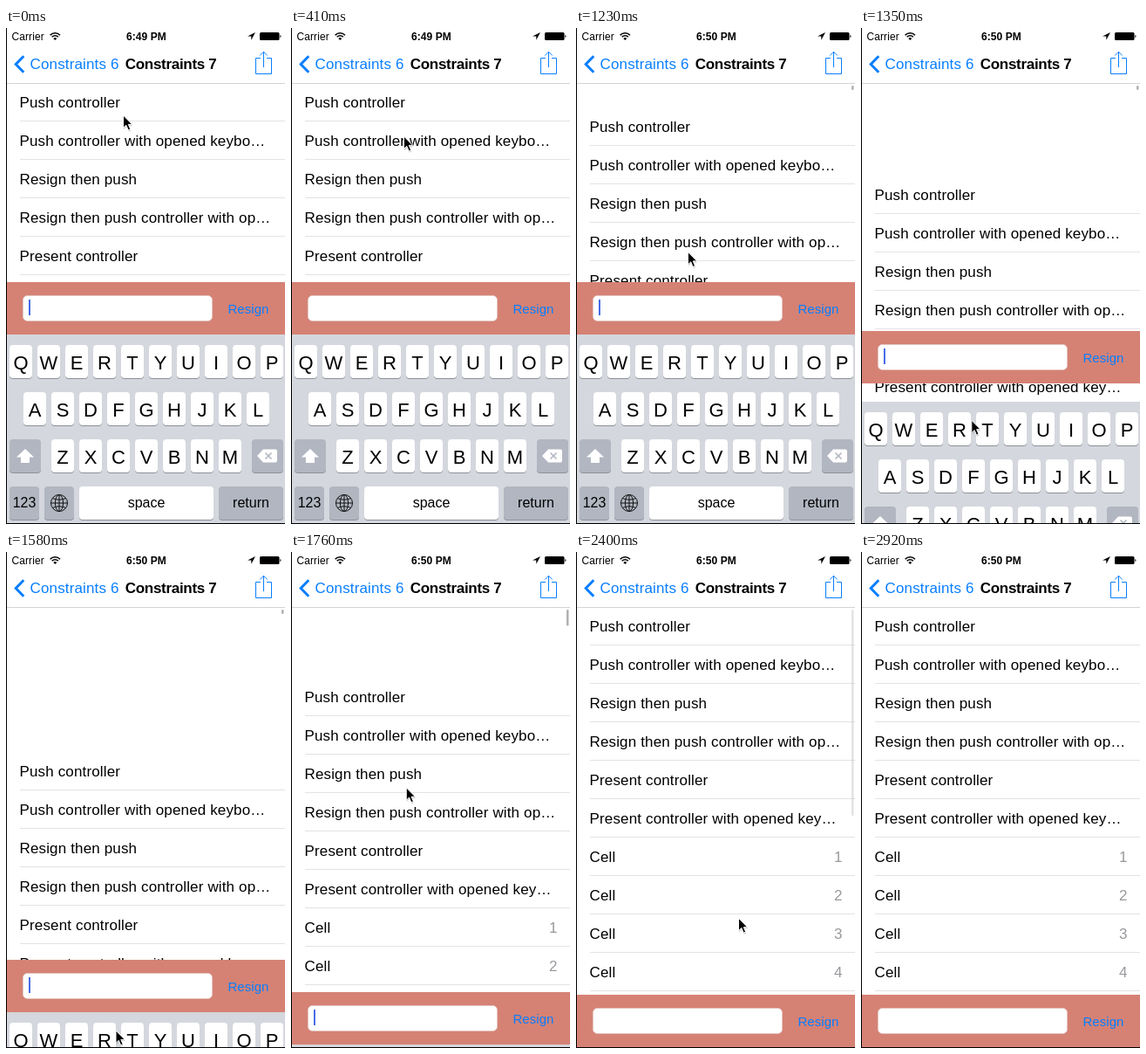
Animation of 320x568 px, one loop 3.79 s. Source, as an HTML page:

```html
<!DOCTYPE html>
<html lang="en">
<head>
<meta charset="utf-8">
<title>Keyboard dismissal</title>
<style>
  html, body { margin: 0; width: 100%; height: 100%; overflow: hidden; background: #fff; }
  svg { display: block; width: 100vw; height: 100vh; }
  text { font-family: "Liberation Sans", Arial, sans-serif; font-size: 17px; letter-spacing: .15px; }
  .blue { fill: #087eff; }
  .line { fill: none; stroke: #087eff; }
  .status { font-size: 12px; letter-spacing: .08px; }
  .bold { font-weight: bold; }
  .mid { text-anchor: middle; }
  .letter { font-size: 22px; letter-spacing: 0; }
  .label { font-size: 16px; letter-spacing: 0; }
</style>
</head>
<body>
<svg viewBox="0 0 320 568">
  <rect width="320" height="568" fill="#fff"/>
  <g id="list"></g>
  <rect id="scroller" x="316" y="66" width="2.5" rx="1.25" fill="#b0b0b0"/>

  <g id="nav">
    <rect width="320" height="63" fill="#fff"/>
    <rect y="63" width="320" height="1" fill="#d4d4d4"/>
    <text class="status" x="6.5" y="13.5">Carrier</text>
    <g fill="none" stroke="#000" stroke-width="1.6">
      <path d="M50.6 8.2a8 8 0 0 1 11.4 0M52.7 10.3a5 5 0 0 1 7.2 0"/>
      <path d="M56.3 14l-2-2.1a2.9 2.9 0 0 1 4 0z" fill="#000" stroke="none"/>
    </g>
    <text id="clock" class="status bold mid" x="161" y="13.5"></text>
    <path d="M286 5l-9 4.4h4.3v4.3z"/>
    <rect x="291" y="5" width="22.5" height="9" rx="1.5"/>
    <path d="M314.4 8a1.6 1.6 0 0 1 0 3z"/>
    <path class="line" d="M20.3 32.3l-9 9.2 9 9.2" stroke-width="3"/>
    <text class="blue" x="27.5" y="47">Constraints 6</text>
    <text class="bold" x="136.8" y="47" style="letter-spacing:-.3px">Constraints 7</text>
    <path class="line" d="M292 34.5h-5.5v18h18v-18h-5.5M295.5 27v18M291.2 31.5l4.3-4.3 4.3 4.3"/>
  </g>

  <g id="keys"></g>
  <g id="bar">
    <rect width="320" height="60" fill="#d58275"/>
    <rect x="19.5" y="15.5" width="217" height="29" rx="5" fill="#fff" stroke="#e3c4bf" stroke-width=".7"/>
    <rect id="caret" x="26" y="20" width="2" height="18" fill="#4a6be8"/>
    <text class="blue" x="254.5" y="35.5" style="font-size:15px;letter-spacing:.03px">Resign</text>
  </g>

  <path d="M0 0h1v568h-1zM0 567h320v1h-320z"/>
  <g id="cursor">
    <path d="M.5 2v14l3.3-3 2.4 5.5 2.4-1-2.4-5.4h4.6z" fill="#000" opacity=".2"/>
    <path d="M0 0v14.4l3.3-3.1 2.4 5.6 2.5-1.1-2.4-5.4h4.5z" stroke="#fff" stroke-width="1"/>
  </g>
</svg>
<script>
const LOOP = 3790, STEP = 58.5;
const DRAG = 1090, HOLD = 1462, RELEASE = 1614;
const GRAB_Y = 124, LOW_Y = 548;
const el = id => document.getElementById(id);

// Static parts
const titles = ["Push controller", "Push controller with opened keybo…", "Resign then push",
  "Resign then push controller with op…", "Present controller", "Present controller with opened key…"];

function row(i) {
  const y = 63 + i * 44, n = i - titles.length + 1;
  const detail = n > 0
    ? `<text x="305.5" y="${y + 28}" text-anchor="end" fill="#98989d">${n}</text>` : "";
  return `<text x="15.5" y="${y + 28}">${titles[i] || "Cell"}</text>${detail}
    <rect x="16" y="${y + 43.5}" width="304" height=".5" fill="#c6c5ca"/>`;
}
el("list").innerHTML = Array.from({ length: 11 }, (_, i) => row(i)).join("");

function key(x, y, w, label, dark, cls = "label", drop = 24) {
  return `<rect x="${x}" y="${y + 1}" width="${w}" height="38" rx="4" fill="#8d9096"/>
    <rect x="${x}" y="${y}" width="${w}" height="38" rx="4" fill="${dark ? "#b1b6c1" : "#fff"}"/>
    <text class="mid ${cls}" x="${x + w / 2}" y="${y + drop}">${label}</text>`;
}
const letters = (str, x, y) =>
  [...str].map((c, i) => key(x + i * 32, y, 26, c, false, "letter", 27.5)).join("");

// Keyboard coordinates start at its top edge
el("keys").innerHTML = `<rect width="320" height="217" fill="#d4d7dd"/>`
  + letters("QWERTYUIOP", 4, 12) + letters("ASDFGHJKL", 20, 66) + letters("ZXCVBNM", 52, 120)
  + key(4, 120, 36, "", true) + key(282, 120, 36, "", true)
  + key(4, 174, 34, "123", true) + key(44, 174, 34, "", true)
  + key(84, 174, 154, "space") + key(244, 174, 74, "return", true)
  + `<path d="M22 131l10 9.5h-5v6.5h-10v-6.5h-5z" fill="#fff"/>
    <path d="M295 131.5h14q2 0 2 2v11q0 2-2 2h-14l-7-7.5z" fill="#fff"/>
    <path d="M297.5 135.5l7 7m0-7l-7 7" stroke="#b1b6c1" stroke-width="1.6"/>
    <g fill="none" stroke="#111" stroke-width="1">
      <circle cx="61" cy="193" r="9.5"/><ellipse cx="61" cy="193" rx="4.6" ry="9.5"/>
      <path d="M61 183.5v19M51.5 193h19M53.3 187.5q7.7 3.4 15.4 0M53.3 198.5q7.7-3.4 15.4 0"/>
    </g>`;

// Motion
const mix = (a, b, k) => a + (b - a) * k;
const half = v => Math.round(v * 2) / 2;

function ease(t, from, to) {
  const s = Math.min(1, Math.max(0, (t - from) / (to - from)));
  return s * s * (3 - 2 * s);
}

const finger = t => mix(GRAB_Y, LOW_Y, ease(t, DRAG, HOLD));

// Rubber-band resistance of an overscrolled list
const rubber = d => 568 * (1 - 1 / (1 + d * .55 / 568));

// The list trails the finger, then springs back critically damped
function listY(t) {
  if (t < RELEASE) return rubber(finger(t - 56) - GRAB_Y);
  const u = (t - RELEASE) / 82;
  return rubber(LOW_Y - GRAB_Y) * (1 + u) * Math.exp(-u);
}

// The finger pushes the keyboard down; once released it slides out
function keysY(t) {
  if (t < RELEASE) return Math.max(351, finger(t) - 21);
  return 568 - (589 - LOW_Y) * Math.exp((RELEASE - t) / 60);
}

const barY = t => Math.min(507, keysY(t < RELEASE ? t - 14 : t) - (t < HOLD ? barGap(t) : 60));

// The bar falls slightly behind the keyboard while dragging
const barGap = t => 60;

// Pointer legs: start, end, x, y
const legs = [
  [0, 410, 129.5, GRAB_Y],
  [DRAG, HOLD, 126, LOW_Y],
  [1580, 1800, 133, 236],
  [1800, 1980, 139.5, 236],
  [2040, 2340, 186, 415],
  [2340, 2930, 204, 569]
];

function pointer(t) {
  return legs.reduce(([x, y], [from, to, nx, ny]) => {
    const k = ease(t, from, to);
    return [mix(x, nx, k), mix(y, ny, k)];
  }, [134.5, 100]);
}

const move = (id, x, y) => el(id).setAttribute("transform", `translate(${x} ${y})`);

function draw(ms) {
  const t = Math.floor((ms + 8) / STEP) * STEP;
  move("list", 0, half(listY(t)));
  move("bar", 0, Math.round(barY(t)));
  move("keys", 0, Math.round(keysY(t)));
  move("cursor", ...pointer(t));
  el("clock").textContent = t < 1170 ? "6:49 PM" : "6:50 PM";
  el("caret").setAttribute("opacity", t < 1810 ? 1 - ease(t, 280, 405) + ease(t, 650, 815) : 0);
  el("scroller").setAttribute("height", mix(5, 236, ease(t, 1706, 2041)));
  el("scroller").setAttribute("opacity", t < 1110 ? 0 : 1 - ease(t, 2290, 2470));
}

const start = performance.now();
function tick() {
  draw((performance.now() - start) % LOOP);
  requestAnimationFrame(tick);
}
tick();
</script>
</body>
</html>
```
